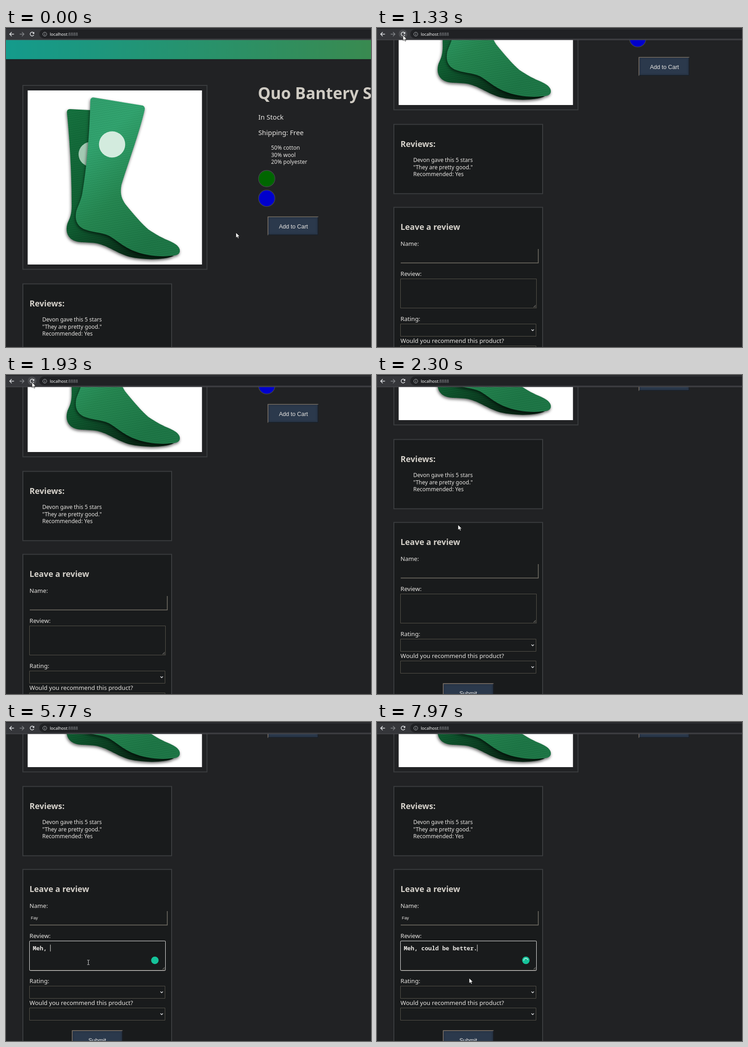
Animation of 800 by 700 pixels, one loop 8000 ms. Source, as an HTML page:

```html
<!DOCTYPE html>
<html lang="en">
<head>
<meta charset="utf-8">
<title>Product page</title>
<style>
  html, body { margin: 0; width: 100%; height: 100%; overflow: hidden; background: #212224; }
  svg { display: block; }
  text { font-family: "Noto Sans", sans-serif; fill: #e8e6e3; white-space: pre; }
  .title { font-size: 35px; font-weight: 700; fill: #cfcbc3; }
  .heading { font-size: 17.8px; font-weight: 700; fill: #d6d2cb; }
  .info { font-size: 14.8px; }
  .list { font-size: 12px; }
  .label { font-size: 13.1px; }
  .button { font: 12.6px "Liberation Sans", Arial, sans-serif; text-anchor: middle; }
  .url { font-size: 9.1px; font-weight: 500; fill: #fff; }
  #name { font: 9.3px "Liberation Sans", Arial, sans-serif; }
  #review { font: 600 12.78px "Noto Sans Mono", monospace; }
  .box { fill: none; stroke: #3b3d3f; stroke-width: 2; }
  .panel { fill: #191b1c; stroke: #3b3d3f; stroke-width: 2; }
  .field { fill: #191b1c; stroke: #56534a; }
  .focus { fill: none; stroke: #e6e6e6; }
  .line { fill: none; stroke: #e8eaed; stroke-width: 1.4; }
  .sock { filter: drop-shadow(-1px 3px 3px #0009); }
</style>
</head>
<body>
<svg width="800" height="700" viewBox="0 0 800 700">
  <defs>
    <linearGradient id="bar"><stop stop-color="#149b8c"/><stop offset="1" stop-color="#398a50"/></linearGradient>
    <linearGradient id="front" x1="0" y1="0" x2=".55" y2="1">
      <stop stop-color="#2f9f6c"/><stop offset=".3" stop-color="#30a56f"/>
      <stop offset=".65" stop-color="#23864f"/><stop offset="1" stop-color="#1b7544"/>
    </linearGradient>
    <linearGradient id="back" x1="0" y1="0" x2=".6" y2="1">
      <stop stop-color="#12703c"/><stop offset=".6" stop-color="#0c5a2e"/><stop offset="1" stop-color="#04200f"/>
    </linearGradient>
    <pattern id="knit" width="4" height="4" patternUnits="userSpaceOnUse" patternTransform="rotate(8)">
      <path d="M0 0L2 2L4 0" fill="none" stroke="#04361d" stroke-opacity=".2"/>
      <path d="M0 2L2 4L4 2" fill="none" stroke="#9fe0bd" stroke-opacity=".1"/>
    </pattern>
    <path id="frontShape" d="M192 152.500L299 170Q305 172 304 179C293 228 268 295 253 344C250 362 252 373 262 387C280 409 298 430 312 442C328 453 345 462 360 468C373 474 382 481 381 490C380 498 372 499 361 500C335 503 303 499 277 488C256 479 243 466 226 456C208 448 186 448 170 441C153 432 151 418 154 402C158 390 164 379 167 364C176 311 183 240 185 158Q186 152 192 152.500Z"/>
    <path id="backShape" d="M140 178L200 181L200 440L330 494L368 500C347 509 305 510 270 502C240 493 222 476 195 472C175 469 157 473 143 463C132 454 131 441 135 428C140 417 144 409 144 390C144 320 140 250 133.500 184Q134 178 140 178Z"/>
    <clipPath id="backClip"><use href="#backShape"/></clipPath>
    <clipPath id="photo"><path d="M47.500 137H429.500V519H47.500Z"/></clipPath>
    <g id="btn">
      <path d="M0 0H111V41H0Z" fill="#2b394c"/>
      <path d="M3 3H108V38H3Z" fill="none" stroke="#273345" stroke-width="4" opacity=".6"/>
      <path d="M.7 41V.7H111" fill="none" stroke="#857766" stroke-width="1.400"/>
      <path d="M1 40.300H110.300V1" fill="none" stroke="#171b20" stroke-width="1.400"/>
    </g>
    <g id="select">
      <path class="field" d="M51.500 .5H348.500V27.500H51.500Z"/>
      <path class="line" d="M338.500 12.500l2.700 2.700l2.700-2.700"/>
    </g>
  </defs>

  <rect width="800" height="700" fill="#212224"/>
  <g id="page">
    <path d="M0 68H800V70H0Z" fill="#17181a"/>
    <path d="M0 26H800V68.500H0Z" fill="url(#bar)"/>

    <path class="box" d="M37 126H440.500V529.500H37Z"/>
    <path d="M47.500 137H429.500V519H47.500Z" fill="#fff"/>
    <g clip-path="url(#photo)">
      <g class="sock">
        <use href="#backShape" fill="url(#back)"/>
        <use href="#backShape" fill="url(#knit)"/>
        <circle cx="186" cy="277" r="27" fill="#a3c9b3" clip-path="url(#backClip)"/>
      </g>
      <g class="sock">
        <use href="#frontShape" fill="url(#front)"/>
        <use href="#frontShape" fill="url(#knit)"/>
        <circle cx="232.500" cy="255.500" r="28.800" fill="#d3ebde"/>
      </g>
    </g>

    <text class="title" x="552" y="156">Quo Bantery Socks</text>
    <text class="info" x="553" y="201">In Stock</text>
    <text class="info" x="553" y="235">Shipping: Free</text>
    <text class="list" x="581" y="267">50% cotton</text>
    <text class="list" x="581" y="282.500">30% wool</text>
    <text class="list" x="581" y="298">20% polyester</text>
    <g stroke="#43474a" stroke-width="1.300">
      <circle cx="571.500" cy="330.500" r="18" fill="#006600"/>
      <circle cx="571.500" cy="373.700" r="18" fill="#0000cc"/>
    </g>
    <use href="#btn" x="573.500" y="413.700"/>
    <text class="button" x="630" y="440">Add to Cart</text>

    <path class="panel" d="M37 561.500H363V713.500H37Z"/>
    <text class="heading" x="51.500" y="610.500">Reviews:</text>
    <text class="list" x="79.500" y="644">Devon gave this 5 stars</text>
    <text class="list" x="79.500" y="659.500">"They are pretty good."</text>
    <text class="list" x="79.500" y="675">Recommended: Yes</text>

    <path class="panel" d="M37 743.500H363V1200H37Z"/>
    <text class="heading" x="51.500" y="793">Leave a review</text>
    <text class="label" x="51.500" y="828">Name:</text>
    <path d="M52 865.500H353.500V835" fill="none" stroke="#77736a" stroke-width="1.500"/>
    <rect id="nameFocus" class="focus" x="51.500" y="833.500" width="303" height="33" rx="3"/>
    <text id="name" x="54.500" y="853"></text>

    <text class="label" x="51.500" y="894">Review:</text>
    <path class="field" d="M51.500 900.500H349.500V964.500H51.500Z"/>
    <path d="M343 963l5-5M346 963l2-2" stroke="#9a978f"/>
    <rect id="reviewFocus" class="focus" x="51.500" y="900.500" width="298" height="65" rx="2"/>
    <text id="review" x="58.700" y="921"></text>
    <path id="caret" stroke="#e8e6e3"/>
    <g id="helper" transform="translate(326.300 943)">
      <circle r="8.200" fill="#15c39a"/>
      <path id="spinner" d="M-4.300 1A4.400 4.400 0 0 1 4.300 -1" fill="none" stroke="#fff" stroke-width="1.200"/>
    </g>

    <text class="label" x="51.500" y="993">Rating:</text>
    <use href="#select" y="999"/>
    <text class="label" x="51.500" y="1041">Would you recommend this product?</text>
    <use href="#select" y="1047"/>
    <use href="#btn" x="144.500" y="1096.500"/>
    <text class="button" x="200" y="1122.500">Submit</text>
  </g>

  <path d="M0 0H800V26H0Z" fill="#35363a"/>
  <path d="M0 0H800V1.500H0Z" fill="#202124"/>
  <path d="M0 26H800" stroke="#505154"/>
  <path d="M800 3H83a10 10 0 0 0 0 20H800Z" fill="#202124"/>
  <circle id="hover" cx="57" cy="13" r="9.500" fill="#4b4c50"/>
  <path class="line" d="M17.500 13.500H8M12.500 9L8 13.500L12.500 18"/>
  <path class="line" style="stroke:#85878b" d="M30 13.500H39.500M35 9L39.500 13.500L35 18"/>
  <path class="line" d="M61 15A4.200 4.200 0 1 1 60.500 10.700"/>
  <path d="M62 8.500V12.800H57.700Z" fill="#e8eaed"/>
  <circle cx="85" cy="13.500" r="4.300" fill="none" stroke="#b0b3b7"/>
  <path d="M85 12.800V16M85 11V12" stroke="#b0b3b7"/>
  <text class="url" x="96" y="16.700">localhost<tspan fill="#8d9094">:8888</tspan></text>

  <path id="arrow" d="M0 0V11.500L2.700 9L4.500 13L6.400 12.200L4.700 8.300H8.200Z" fill="#fff" stroke="#111" stroke-width=".8"/>
  <path id="beam" d="M-2.500 -5H-.7L0 -4.500L.7 -5H2.500M0 -4.500V4.500M-2.500 5H-.7L0 4.500L.7 5H2.500" fill="none" stroke="#ddd"/>
</svg>
<script>
const LOOP = 8000;
const el = id => document.getElementById(id);
const show = (id, on) => el(id).setAttribute('visibility', on ? 'visible' : 'hidden');
const move = (id, x, y) => el(id).setAttribute('transform', `translate(${x} ${y})`);

// Rows of [time, ...values]
const scrollKeys = [[60, 0], [190, 280], [265, 280], [370, 350], [2130, 350], [2300, 420]];
const mouseKeys = [
  [60, 504, 449], [190, 493, 455], [265, 493, 455], [840, 62, 13], [1300, 57, 16],
  [1950, 57, 16], [2390, 192, 366], [2850, 173.5, 434.5],
  [4420, 173.5, 434.5], [4780, 180.5, 527.5], [7760, 180.5, 527.5], [7970, 202, 562]
];
const fields = {
  name: { value: 'Fay', focus: 2870, blur: 4770, x: 54.5, top: 845, bottom: 855,
    keys: [3800, 4000, 4070] },
  review: { value: 'Meh, could be better.', focus: 4770, blur: LOOP, x: 58.7, top: 908.5, bottom: 923.5,
    keys: [5170, 5300, 5400, 5530, 5670, 5830, 5900, 6130, 6230, 6300, 6400,
      6530, 6600, 6700, 6800, 6870, 7000, 7130, 7270, 7400, 7630] }
};

function sample(keys, t) {
  const next = keys.findIndex(k => k[0] > t);
  if (next < 1) return keys.at(next).slice(1);
  const a = keys[next - 1], b = keys[next];
  const u = (t - a[0]) / (b[0] - a[0]), ease = u * u * (3 - 2 * u);
  return a.slice(1).map((v, i) => v + (b[i + 1] - v) * ease);
}

function drawField(id, t) {
  const f = fields[id], text = el(id);
  const typed = f.keys.filter(k => k <= t).length;
  text.textContent = f.value.slice(0, typed);
  const focused = t >= f.focus && t < f.blur;
  show(id + 'Focus', focused);
  if (!focused) return;
  const last = typed ? f.keys[typed - 1] : f.focus;
  const x = f.x + (typed ? text.getComputedTextLength() : 0);
  el('caret').setAttribute('d', `M${x + .3} ${f.top}V${f.bottom}`);
  show('caret', (t - last) % 1000 < 500);
}

function draw(t) {
  const [scroll] = sample(scrollKeys, t);
  const [x, y] = sample(mouseKeys, t);
  move('page', 0, -scroll);

  show('caret', false);
  drawField('name', t);
  drawField('review', t);

  const checking = t >= 5170 && t < 5600 || t >= 5830 && t < 5930 || t >= 6100;
  show('helper', t >= 4800);
  show('spinner', t >= 4800 && checking);
  el('spinner').setAttribute('transform', `rotate(${(t - 7970) * .36})`);

  const inside = (top, bottom) => y + scroll > top && y + scroll < bottom;
  const overText = x > 52 && x < 350 && (inside(834, 866) || inside(901, 965));
  show('arrow', !overText);
  show('beam', overText);
  move('arrow', x, y);
  move('beam', x, y);
  show('hover', Math.hypot(x - 57, y - 13) < 10);
}

const start = performance.now();
function tick() {
  draw((performance.now() - start) % LOOP);
  requestAnimationFrame(tick);
}
tick();
</script>
</body>
</html>
```
